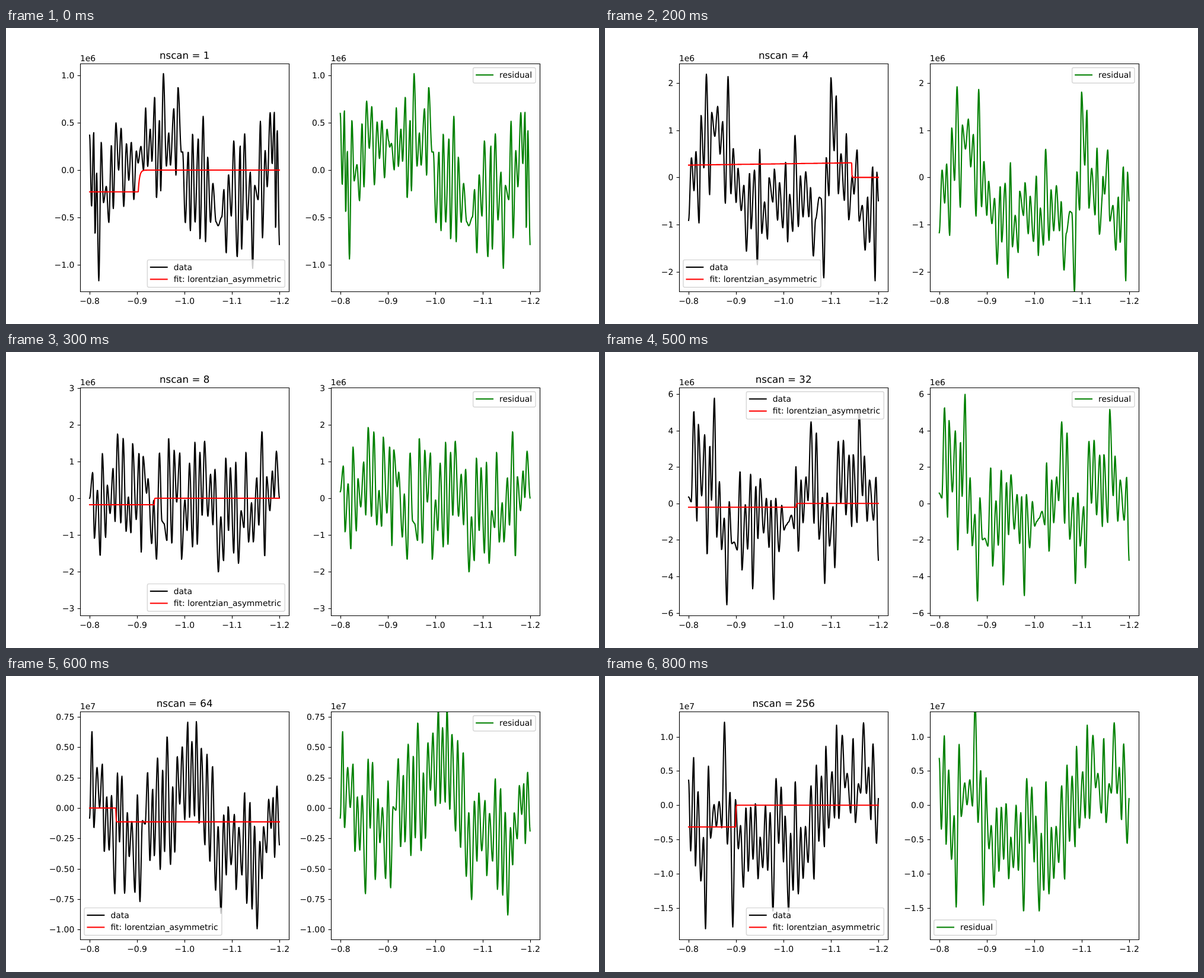
An HTML page that plays this animation: 1000 px wide and 500 px high, repeating every 900 ms.

```html
<!DOCTYPE html>
<html lang="en">
<head>
<meta charset="utf-8">
<title>nscan</title>
<style>
html, body { margin: 0; width: 100%; height: 100%; overflow: hidden; background: #fff; }
svg { display: block; width: 1000px; height: 500px; }
text { font: 13.89px "DejaVu Sans", sans-serif; text-rendering: geometricPrecision; }
.title { font-size: 16.67px; }
.mid { text-anchor: middle; }
.end { text-anchor: end; }
.line { fill: none; stroke-width: 2.08; stroke-linejoin: round; stroke-linecap: square; }
.axis { fill: none; stroke: #000; stroke-width: 1.11; }
.box { fill: #fff; stroke: #ccc; stroke-width: 1.39; opacity: .8; }
.scan { visibility: hidden; animation: show 900ms step-end infinite; }
@keyframes show {
  0% { visibility: visible; }
  11.112%, 100% { visibility: hidden; }
}
</style>
</head>
<body>
<svg id="stage" viewBox="0 0 1000 500"></svg>
<script>
const TOP = 60, BOTTOM = 445, WIDTH = 352.27, LEFT = 125, RIGHT = 547.73;
const X0 = 141.01, X1 = 461.26, SHIFT = RIGHT - LEFT;

// zero, step, unit: vertical axis; from, at, to: fitted step
// first, last: ends of the curve; peaks: its main x, y extremes
const scans = [
  { zero: 240, step: 80.2, unit: .5, legend: 'br', from: 276.7, at: 223, soft: 2.2,
    first: 181, last: 368, peaks: [156.5, 427, 235.5, 135, 265.5, 77, 336.5, 361, 416, 406, 445.5, 143] },
  { zero: 249, step: 59, unit: .5, legend: 'bl', from: 262, at: 286 },
  { zero: 252.4, step: 79.7, unit: 1, legend: 'bl', from: 231.6, at: 416, slope: -.014,
    first: 325, last: 293, peaks: [171, 78, 207.5, 82, 238.5, 377, 369, 422, 381, 84, 455.5, 427] },
  { zero: 247, step: 62, unit: 1, legend: 'br', from: 258, at: 250 },
  { zero: 233, step: 81.2, unit: 2, legend: 'bl', from: 228.3, at: X1,
    first: 194, last: 234, peaks: [149, 90, 210, 78, 261, 370, 312.5, 424, 370.5, 94, 399.5, 353] },
  { zero: 255.7, step: 61.6, unit: 2, legend: 'tr', from: 262.2, at: 322.5,
    first: 245, last: 353, peaks: [184.5, 78, 205.5, 427, 284.5, 418, 347.5, 118, 370.5, 391, 428.5, 97] },
  { zero: 223, step: 51.3, unit: .25, legend: 'bl', from: 223, at: 185.3, to: 246.4,
    first: 240, last: 286, peaks: [145, 94, 200, 367, 306.5, 78, 321, 77, 362.5, 401, 423.5, 427] },
  { zero: 240, step: 81, unit: .5, legend: 'bl', from: 252, at: 338 },
  { zero: 218.3, step: 57.9, unit: .5, legend: 'br', legend2: 'bl', from: 255, at: 220.4,
    first: 176, last: 206, peaks: [169.5, 427, 201.5, 78, 215.5, 424, 326, 368, 390.5, 83, 436, 79] }
];

const snap = v => Math.floor(v + .5) + .5;
const num = (v, d) => v.toFixed(d).replace('-', '\u2212');
const label = (x, y, s, cls = '') => `<text x="${x}" y="${y}" class="${cls}">${s}</text>`;
const pen = (d, color, clip = '') => `<path class="line" d="${d}" stroke="${color}" ${clip && `clip-path="url(#${clip})"`}/>`;

// Mulberry32 generator
function random(seed) {
  return () => {
    seed = seed + 0x6D2B79F5 | 0;
    let t = Math.imul(seed ^ seed >>> 15, 1 | seed);
    t = t + Math.imul(t ^ t >>> 7, 61 | t) ^ t;
    return ((t ^ t >>> 14) >>> 0) / 4294967296;
  };
}

// Main extremes with seeded up-and-down noise filled in between
function turns({ zero, first = zero, last = zero, peaks = [] }, seed) {
  const rnd = random(seed), main = [[X0, first]], out = [];
  for (let i = 0; i < peaks.length; i += 2) main.push([peaks[i], peaks[i + 1]]);
  main.push([X1, last]);
  for (let i = 0; i + 1 < main.length; i++) {
    const [ax, ay] = main[i], [bx, by] = main[i + 1];
    const side = ay < zero ? 1 : -1;
    const odd = (ay < zero) === (by < zero) ? 0 : 1;
    let n = Math.max(1, Math.round((bx - ax) / 4.4));
    if (n % 2 !== odd) n++;
    out.push([ax, ay]);
    for (let k = 1; k < n; k++) {
      const x = ax + (bx - ax) * (k + (rnd() - .5) * .5) / n;
      const base = zero + .35 * (ay + (by - ay) * k / n - zero);
      const drift = (rnd() + rnd() - 1) * 60;
      const swing = (k % 2 ? side : -side) * (10 + 85 * rnd());
      out.push([x, Math.max(100, Math.min(400, base + drift + swing))]);
    }
  }
  return out.concat([main[main.length - 1]]);
}

// Smooth curve through the turning points, for rising x
function curve(pts) {
  let i = 0;
  return x => {
    while (i + 2 < pts.length && x > pts[i + 1][0]) i++;
    const [ax, ay] = pts[i], [bx, by] = pts[i + 1];
    const u = (x - ax) / (bx - ax);
    return ay + (by - ay) * u * u * (3 - 2 * u);
  };
}

const fitted = ({ zero, from, at, to = zero, soft = .3, slope = 0 }) => x =>
  x <= at ? from + slope * (x - X0) : to + (from + slope * (at - X0) - to) * Math.exp((at - x) / soft);

function axes(x, s, exp) {
  let out = `<path class="axis" d="M${snap(x)} 60.5H${snap(x + WIDTH)}V445.5H${snap(x)}Z"/>`;
  for (let i = 0; i < 5; i++) {
    const tx = x + X0 - LEFT + i * (X1 - X0) / 4;
    out += `<path class="axis" d="M${snap(tx)} 445.5v4.86"/>` + label(tx, 466, num(-.8 - i / 10, 1), 'mid');
  }
  const digits = s.unit >= 1 ? 0 : s.unit === .5 ? 1 : 2;
  for (let k = -8; k <= 8; k++) {
    const y = s.zero - k * s.step;
    if (y < TOP || y > BOTTOM) continue;
    out += `<path class="axis" d="M${snap(x)} ${snap(y)}h-4.86"/>`
      + label(x - 9.72, Math.round(y + 5), num(k * s.unit, digits), 'end');
  }
  return out + label(x, 56, exp);
}

function legend(x, corner, w, rows) {
  const h = 5.6 + 20.4 * rows.length;
  const bx = corner[1] === 'r' ? x + WIDTH - 6.94 - w : x + 6.94;
  const by = corner[0] === 't' ? TOP + 6.94 : BOTTOM - 6.94 - h;
  return `<rect class="box" x="${bx}" y="${by}" width="${w}" height="${h}" rx="2.78"/>`
    + rows.map(([s, color], i) => {
      const y = by + 12.4 + 20.4 * i;
      return pen(`M${bx + 5.56} ${y}h27.78`, color) + label(bx + 44.45, Math.round(y + 4.6), s);
    }).join('');
}

function plot(s, i) {
  const data = curve(turns(s, i + 1)), fit = fitted(s);
  const n = 2 ** i, exp = n < 64 ? '1e6' : '1e7';
  const paths = ['', '', ''];
  for (let x = X0; x <= X1; x += .5) {
    const y = data(x), f = fit(x);
    [[x, y], [x, f], [x + SHIFT, y - f + s.zero]].forEach(([px, py], k) => {
      paths[k] += `${paths[k] ? 'L' : 'M'}${px.toFixed(1)} ${py.toFixed(1)}`;
    });
  }
  return `<g class="scan" style="animation-delay:${i * 100 - 900}ms"><rect width="1000" height="500" fill="#fff"/>`
    + pen(paths[0], '#000', 'left') + pen(paths[1], '#f00', 'left') + pen(paths[2], '#008000', 'right')
    + axes(LEFT, s, exp) + axes(RIGHT, s, exp)
    + label(LEFT + WIDTH / 2, 52, `nscan = ${n}`, 'title mid')
    + legend(LEFT, s.legend, 232, [['data', '#000'], ['fit: lorentzian_asymmetric', '#f00']])
    + legend(RIGHT, s.legend2 || 'tr', 105.4, [['residual', '#008000']]) + '</g>';
}

const clip = (id, x) => `<clipPath id="${id}"><rect x="${x}" y="${TOP}" width="${WIDTH}" height="385"/></clipPath>`;
document.getElementById('stage').innerHTML = clip('left', LEFT) + clip('right', RIGHT) + scans.map(plot).join('');
</script>
</body>
</html>
```
